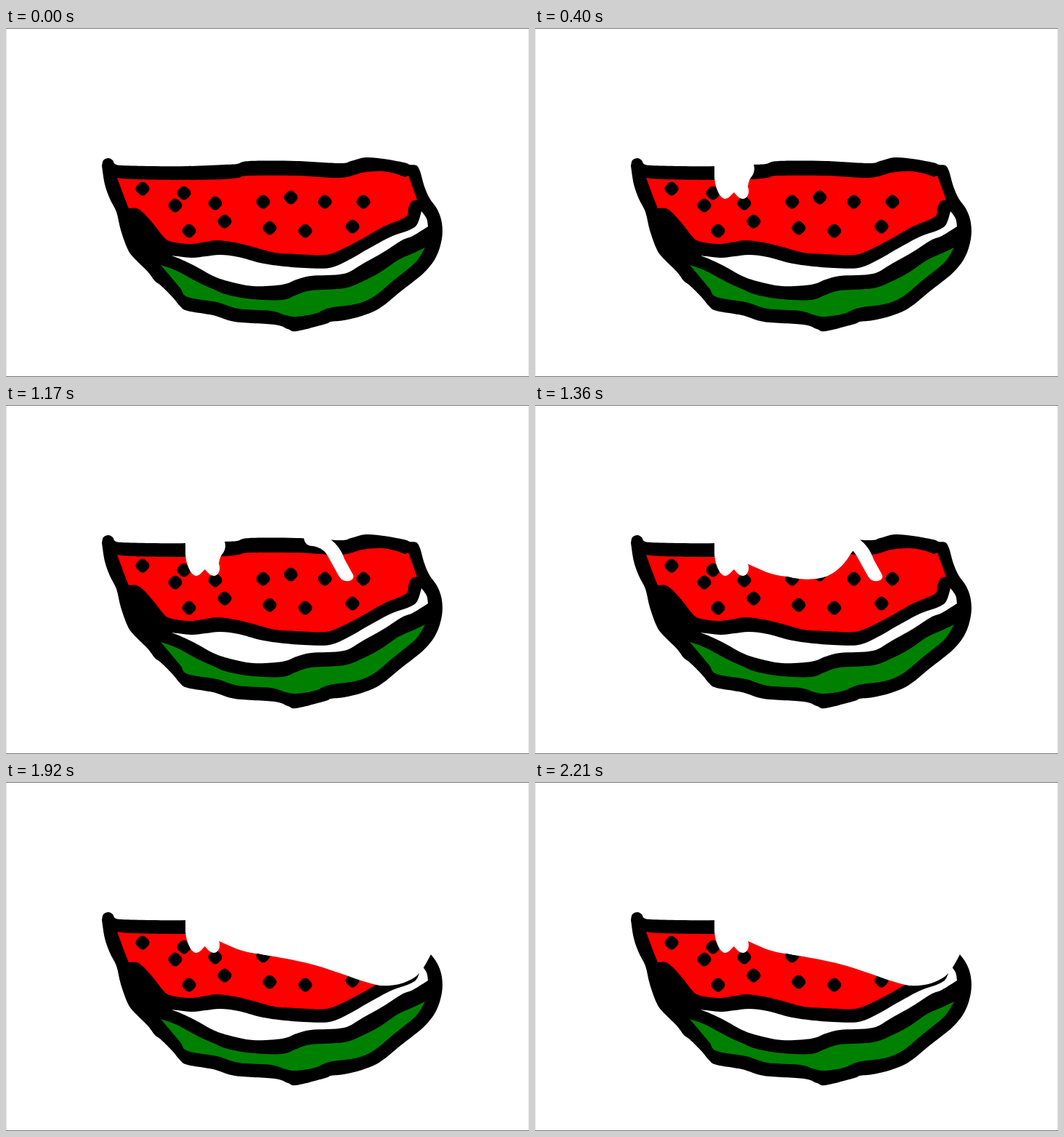
An HTML page for the animation above (2400 ms loop, 720 by 480 pixels).

```html
<!DOCTYPE html>
<html lang="en">
<head>
<meta charset="utf-8">
<title>Watermelon</title>
<style>
html, body { margin: 0; width: 100%; height: 100%; overflow: hidden; background: #fff; }
svg { display: block; width: 100vw; height: 100vh; }
</style>
</head>
<body>
<svg id="stage" viewBox="0 0 720 480"></svg>
<script>
const stage = document.getElementById('stage');
const LOOP = 2400;

function add(tag, attrs) {
  const el = document.createElementNS('http://www.w3.org/2000/svg', tag);
  for (const k in attrs) el.setAttribute(k, attrs[k]);
  return stage.appendChild(el);
}

// Smooth curve through the points; "|" marks a sharp corner.
function smooth(text) {
  let d = '', last;
  for (const part of text.split('|')) {
    const pts = part.trim().split(/\s+/).map(p => p.split(',').map(Number));
    if (last) pts.unshift(last);
    else d = 'M' + pts[0];
    for (let i = 0; i < pts.length - 1; i++) {
      const b = pts[i], c = pts[i + 1];
      const a = pts[i - 1] || b, e = pts[i + 2] || c;
      const c1 = b.map((v, k) => v + (c[k] - a[k]) / 6);
      const c2 = c.map((v, k) => v - (e[k] - b[k]) / 6);
      d += `C${c1} ${c2} ${c}`;
    }
    last = pts[pts.length - 1];
  }
  return d + 'Z';
}

const shape = (fill, text) => add('path', { fill, d: smooth(text) });

// rind outline
shape('#000', `132,190 134,182 141,179 147,182 150,187 160,189 200,190 250,190 300,188
  318,187 335,183 400,183 460,186 475,183 495,178 520,180 548,185 556,188 565,189 570,197
  576,218 583,234 594,250 600,268 600,290 592,315 575,337 545,361 515,385 490,396 465,402
  447,404 440,407 400,417 388,414 370,408 315,404 285,395 250,389 240,383 230,371 213,354
  205,348 195,335 175,315 167,303 158,278 152,253 143,235 136,215 132,190`);

// flesh
shape('#f00', `153,206 175,208 245,209 300,208 320,206 335,203 400,203 460,206 490,199
  515,197 535,200 549,205 | 554,203 | 566,236 | 558,239 554,248 550,260 520,273 490,290
  465,303 440,312 400,311 370,309 340,301 315,295 290,292 270,295 250,297 225,293 215,285
  205,272 190,255 180,248 169,248 | 163,233 153,206`);

// pith
shape('#fff', `228,313 255,316 275,314 295,312 320,315 350,323 375,327 410,330 445,330
  470,320 500,303 530,287 555,278 566,270 572,252 | 579,262 581,273 | 560,286 545,292
  520,308 490,325 465,338 420,341 400,346 380,353 340,355 305,348 285,341 265,330 245,320
  228,313`);

// skin
shape('#008000', `213,326 235,334 265,350 285,359 305,367 340,373 380,374 400,367 420,361
  465,358 490,349 515,336 540,319 560,310 577,302 | 565,321 545,338 530,350 515,363
  500,373 480,380 445,385 425,393 400,397 385,395 365,389 320,386 290,377 250,370 240,358
  225,340 | 213,326`);

const seeds = [[188, 221], [245, 227], [233, 244], [288, 241], [252, 279], [301, 266],
  [354, 239], [392, 233], [439, 239], [492, 239], [363, 275], [412, 279], [477, 273]];
for (const [x, y] of seeds) {
  add('path', {
    transform: `translate(${x} ${y})`,
    d: 'M-4-8Q0-11 4-8L8-4Q11 0 8 4L4 8Q0 11-4 8L-8 4Q-11 0-8-4Z'
  });
}

const bites = [
  [400, `M247 176V205C248 220 254 233 261 235C267 235 270 229 274 226C277 230 281 235 287 235
    C293 234 296 226 293 218C294 212 295 209 297 206C302 200 303 194 301 188V176Z`],
  [880, `M410 176V183C411 190 415 194 422 194C430 195 438 199 442 206L457 233
    C461 241 466 243 472 242C478 241 480 236 477 232L466 212C462 200 455 191 447 185V176Z`],
  [1360, `M290 174V217L294 219C308 225 325 235 348 236C370 242 390 240 403 235
    C418 228 428 216 435 204L447 190V174Z`],
  [1920, `M290 170V217L294 219C308 225 325 234 347 236C370 240 387 243 410 248
    C447 256 484 274 515 280C538 281 552 276 565 267C574 259 579 248 585 237L606 222V170Z`]
].map(([at, d]) => ({ at, el: add('path', { d, fill: '#fff' }) }));

// stage frame
const line = (x, y, width, height, fill) => add('rect', { x, y, width, height, fill });
line(0, 0, 1, 480, '#e4e4e4');
line(719, 0, 1, 480, '#e4e4e4');
line(0, 0, 720, 1, '#777');
line(0, 479, 720, 1, '#777');

function draw(t) {
  for (const { at, el } of bites) el.setAttribute('visibility', t >= at ? 'visible' : 'hidden');
}

const start = performance.now();
function tick() {
  draw((performance.now() - start) % LOOP);
  requestAnimationFrame(tick);
}
tick();
</script>
</body>
</html>
```
